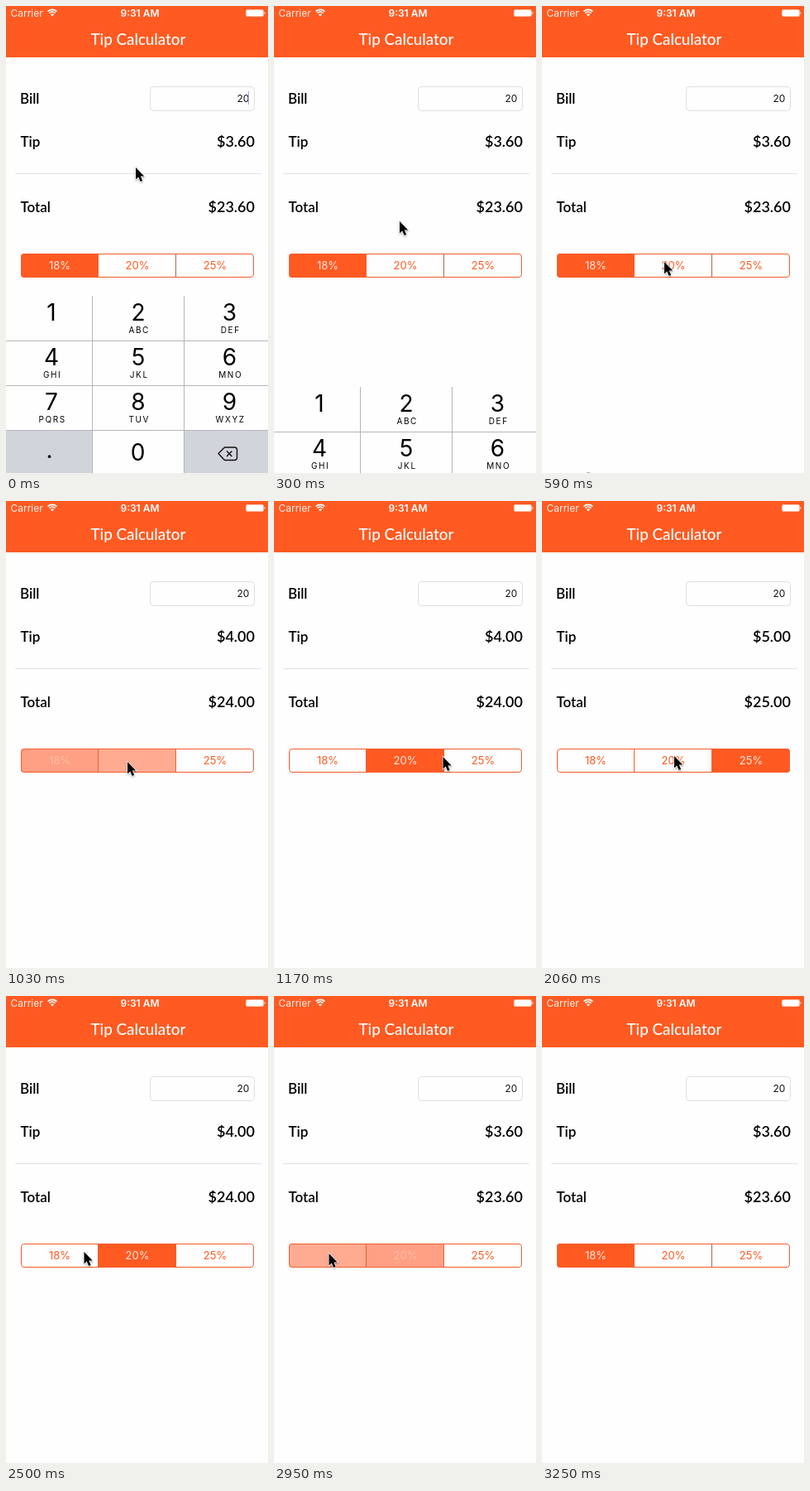
Animation of 317 by 564 pixels, one loop 3.86 s. Source, as an HTML page:

```html
<!DOCTYPE html>
<html lang="en">
<head>
<meta charset="utf-8">
<title>Tip Calculator</title>
<style>
  html, body { margin: 0; width: 100%; height: 100%; overflow: hidden; background: #fefefe; }
  svg { display: block; width: 317px; height: 564px; }
  text { font-family: Inter, Roboto, sans-serif; }
  .geo { font-family: Lato, "Open Sans", sans-serif; font-weight: 600; }
  .label { font-size: 17px; }
  .money { font-size: 18px; text-anchor: end; }
  .mid { text-anchor: middle; }
  .digit { font-size: 28px; text-anchor: middle; }
  .letters { font-size: 10px; letter-spacing: 1.6px; text-anchor: middle; }
</style>
</head>
<body>
<svg viewBox="0 0 317 564">
  <defs>
    <clipPath id="round"><rect x="18" y="299" width="282" height="29" rx="4"/></clipPath>
    <filter id="shadow" x="-50%" y="-50%" width="200%" height="200%">
      <feDropShadow dx="0" dy="1" stdDeviation="0.8" flood-opacity="0.4"/>
    </filter>
  </defs>
  <rect width="317" height="564" fill="#fefefe"/>

  <!-- header -->
  <rect width="317" height="62" fill="#ff5a22"/>
  <g fill="#fff">
    <text x="5.5" y="12.5" font-size="12" fill-opacity=".9">Carrier</text>
    <text class="mid" x="162" y="12.5" font-size="12" font-weight="600">9:31 AM</text>
    <text class="geo mid" x="160" y="46.5" font-size="18.8" style="font-weight:500">Tip Calculator</text>
    <path d="M56 12.6L53.9 10.3A3 3 0 0 1 58.1 10.3Z"/>
    <path d="M52.5 8.6A5 5 0 0 1 59.5 8.6M50.6 6.6A7.7 7.7 0 0 1 61.4 6.6" fill="none" stroke="#fff" stroke-width="1.6"/>
    <rect x="290.5" y="4.5" width="21" height="8" rx="1.5" fill="none" stroke="#fff" stroke-opacity=".6"/>
    <rect x="291" y="5" width="20" height="7" rx="1"/>
    <path d="M312.5 7h.5q1 1.5 0 3h-.5Z"/>
  </g>

  <!-- form -->
  <text class="geo label" x="17" y="118">Bill</text>
  <text class="geo label" x="17.5" y="170">Tip</text>
  <text class="geo label" x="17.5" y="249">Total</text>
  <rect x="174.5" y="97.5" width="126" height="29" rx="4" fill="#fefefe" stroke="#dedede"/>
  <text x="294.3" y="116" font-size="12" text-anchor="end" fill="#111">20</text>
  <rect id="caret" x="293" y="103" width="1" height="16" fill="#a3a9ee"/>
  <rect x="11" y="202" width="298" height="1" fill="#e4e4e4"/>
  <text class="geo money" id="tip" x="301" y="170"></text>
  <text class="geo money" id="total" x="301" y="249"></text>

  <!-- percent picker -->
  <g id="segments" clip-path="url(#round)"></g>
  <rect x="111" y="299" width="1" height="29" fill="#f0612f"/>
  <rect id="divider" x="205" y="299" width="1" height="29"/>
  <rect x="18.5" y="299.5" width="281" height="28" rx="3.5" fill="none" stroke="#f25c2c"/>

  <!-- keypad -->
  <g id="keypad">
    <rect y="350" width="317" height="214" fill="#fefefe"/>
    <path d="M0 512H104V564H0ZM215 512H317V564H215Z" fill="#d1d4db"/>
    <path d="M104.5 350V564M215.5 350V564M0 404.5H317M0 458.5H317M0 512.5H317" stroke="#b5b6b9"/>
    <g id="keys"></g>
    <path d="M257 540.5L263.4 534Q264.4 533 265.6 533H276.5Q279.5 533 279.5 536V545.5Q279.5 548.5 276.5 548.5H265.6Q264.4 548.5 263.4 547.5ZM267 537.5L273.4 544M273.4 537.5L267 544"
      fill="none" stroke="#111" stroke-width="1.4" stroke-linejoin="round"/>
  </g>
  <rect id="speck" x="54" y="563" width="4" height="1" fill="#b4b4b4"/>

  <path id="cursor" d="M0 0V14.4L3.2 11.4L5.6 17L8.2 15.9L5.8 10.4H10.2Z" fill="#000"
    stroke="#fff" stroke-width="1.3" paint-order="stroke" filter="url(#shadow)"/>
</svg>
<script>
const LOOP = 3860, BILL = 20, RATES = [18, 20, 25];
const ORANGE = "#ff5a22";
const $ = id => document.getElementById(id);

function add(parent, tag, attrs, text = "") {
  const el = document.createElementNS("http://www.w3.org/2000/svg", tag);
  for (const k in attrs) el.setAttribute(k, attrs[k]);
  el.textContent = text;
  parent.append(el);
  return el;
}

// fill and label colour of one segment
const LOOKS = {
  off: ["#fefefe", ORANGE],
  on: [ORANGE, "#ffe9e1"],
  press: ["#ffe5e0", "#ff8560"],
  rise: ["#ffab92", "#ffab92"],
  fall: ["#ff9f84", "#ffbda9"]
};

const segments = RATES.map((rate, i) => {
  const x = 18 + 94 * i;
  return {
    box: add($("segments"), "rect", { x: x - (i ? 1 : 0), y: 299, width: 95, height: 29 }),
    label: add($("segments"), "text", { class: "mid", x: x + 47, y: 318, "font-size": 13 }, rate + "%")
  };
});

["", "ABC", "DEF", "GHI", "JKL", "MNO", "PQRS", "TUV", "WXYZ"].forEach((letters, i) => {
  const x = [55, 160, 270.5][i % 3], y = 380 + 54 * Math.floor(i / 3);
  add($("keys"), "text", { class: "digit", x, y }, i + 1);
  add($("keys"), "text", { class: "letters", x: x + 1.2, y: y + 15.3 }, letters);
});
add($("keys"), "text", { class: "digit", x: 159.5, y: 549 }, "0");
add($("keys"), "text", { class: "digit", x: 52.5, y: 546 }, ".");

// pointer: time, x, y
const POINTER = [
  [0, 157, 195], [150, 156, 168], [300, 152, 260], [450, 150, 309], [590, 148, 309],
  [740, 141, 318], [880, 145, 317], [1030, 147, 315], [1170, 204.5, 309], [1320, 255, 304],
  [1470, 257, 304], [1610, 257, 305], [1760, 257.5, 306], [1910, 176, 308], [2060, 160, 308],
  [2500, 94.5, 309], [2650, 73, 309], [2800, 66.5, 311], [3100, 115, 285], [3250, -40, 0]
];
// picker: time, index of the rate in use, looks
const PICKER = [
  [0, 0, "on off off"], [1030, 1, "fall rise off"], [1170, 1, "off on off"],
  [1760, 1, "off on press"], [1910, 2, "off off on"], [2360, 1, "off press on"],
  [2500, 1, "off on off"], [2800, 1, "press on off"], [2950, 0, "rise fall off"],
  [3100, 0, "on off off"]
];
// keypad: time, distance slid down
const KEYPAD = [[0, 0], [300, 110], [450, 202], [590, 214]];

const at = (steps, t) => steps.findLast(s => s[0] <= t);
const show = (el, on) => el.setAttribute("visibility", on ? "visible" : "hidden");

function draw(t) {
  const [, x, y] = at(POINTER, t);
  $("cursor").setAttribute("transform", `translate(${x} ${y})`);

  const [, pick, looks] = at(PICKER, t);
  const tip = BILL * RATES[pick] / 100;
  $("tip").textContent = "$" + tip.toFixed(2);
  $("total").textContent = "$" + (BILL + tip).toFixed(2);
  looks.split(" ").forEach((look, i) => {
    const [fill, ink] = LOOKS[look];
    segments[i].box.setAttribute("fill", fill);
    segments[i].label.setAttribute("fill", ink);
  });
  $("divider").setAttribute("fill", looks.startsWith("on") ? "#a06a58" : "#f0612f");

  $("keypad").setAttribute("transform", `translate(0 ${at(KEYPAD, t)[1]})`);
  show($("caret"), t < 150);
  show($("speck"), t >= 590 && t < 1030);
}

const start = performance.now();
function tick() {
  draw((performance.now() - start) % LOOP);
  requestAnimationFrame(tick);
}
tick();
</script>
</body>
</html>
```
